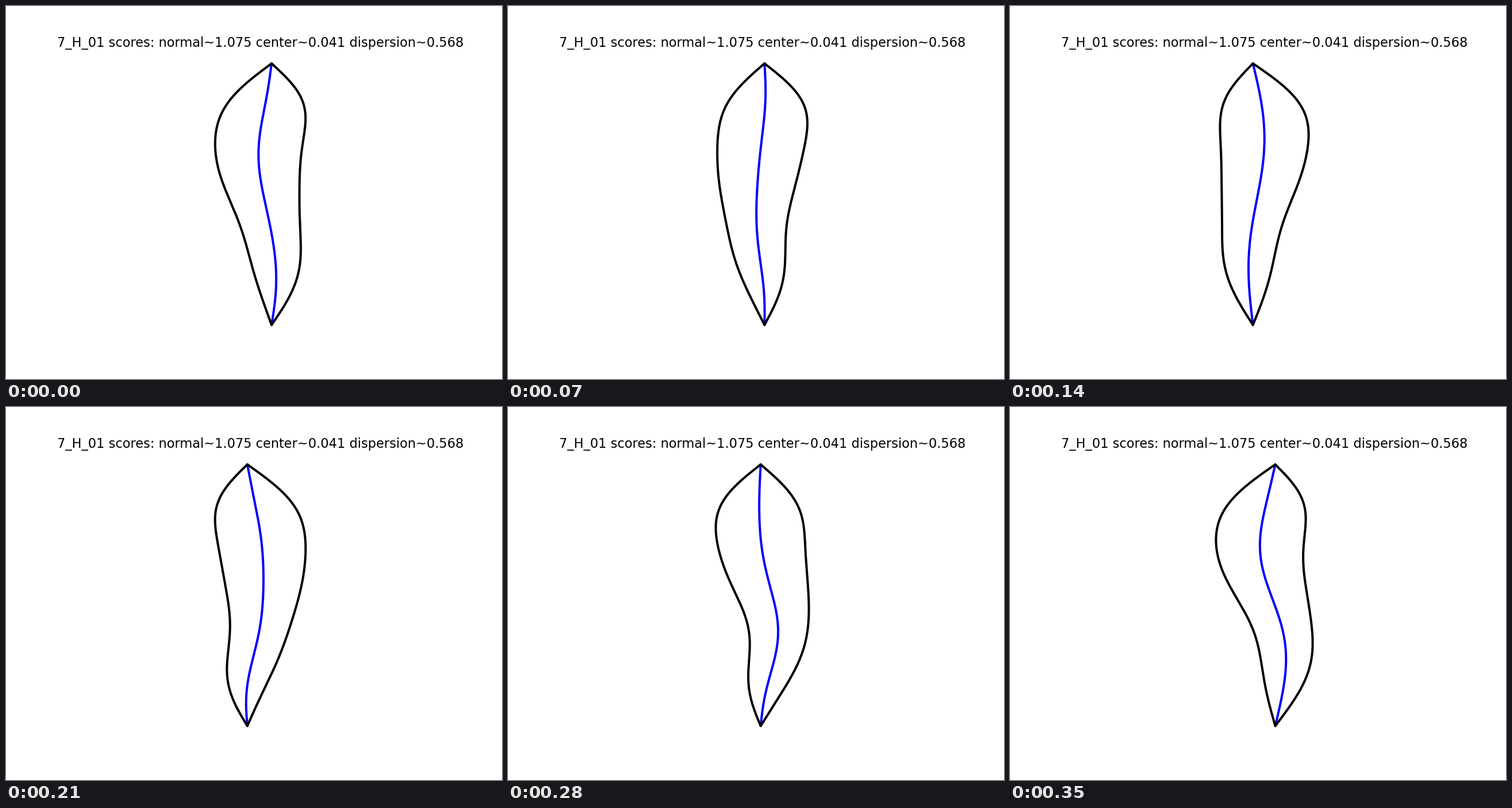
A matplotlib script for the animation above (0.42 s loop, 863x649 px).

```python
import numpy as np
import matplotlib.pyplot as plt
from matplotlib.animation import FuncAnimation

WIDTH, HEIGHT, DPI = 863, 649, 64  # a power of two keeps the pixel size exact
PX = 72 / DPI                      # points per pixel
TOP, BOTTOM, CENTER_X = 100, 555, 442.5
TITLE = "7_H_01 scores: normal~1.075 center~0.041 dispersion~0.568"

FRAMES, STEP = 6, 1.12  # STEP is the phase advance per frame
PHASE, GROWTH = 0.0375, 1.06

s = np.linspace(0, 1, 240)
ys = TOP + (BOTTOM - TOP) * s


def sines(*amplitudes):
    """Sum of standing sine modes that vanish at both tips."""
    return sum(a * np.sin(k * np.pi * s) for k, a in enumerate(amplitudes, 1))


half_width = sines(74, 17.5, 13.5, 2.5, 2.3, 0.9)
rest_bend = sines(4.2, -2.6, 0.3, 1.2)
cos_bend = sines(-15.5, -10.5, 3.1, 0, 0.7)
sin_bend = sines(-8.1, 9.9, 2.3, -1.7, 0.6)


def midline_at(frame):
    """Travelling wave, shifted so the whole body is centred sideways."""
    phase = STEP * frame + PHASE
    wave = cos_bend * np.cos(phase) + sin_bend * np.sin(phase)
    bend = rest_bend + GROWTH**frame * wave
    middle = ((bend - half_width).min() + (bend + half_width).max()) / 2
    return CENTER_X - middle + bend


fig = plt.figure(figsize=(WIDTH / DPI, HEIGHT / DPI), dpi=DPI, facecolor="white")
ax = fig.add_axes([0, 0, 1, 1])
ax.set_xlim(0, WIDTH)
ax.set_ylim(HEIGHT, 0)
ax.axis("off")

ax.text(CENTER_X, 71.5, TITLE, family="DejaVu Sans", size=22.55 * PX,
        ha="center", va="baseline", color="black")

line_style = dict(lw=4 * PX, solid_capstyle="round", solid_joinstyle="round")
midline, = ax.plot([], [], color="blue", **line_style)
outline, = ax.plot([], [], color="black", **line_style)


def draw(frame):
    mid = midline_at(frame)
    midline.set_data(mid, ys)
    outline.set_data(np.r_[mid - half_width, (mid + half_width)[::-1]],
                     np.r_[ys, ys[::-1]])
    return midline, outline


animation = FuncAnimation(fig, draw, frames=FRAMES, interval=70,
                          init_func=lambda: draw(0), repeat=True, repeat_delay=0)
plt.show()
```
